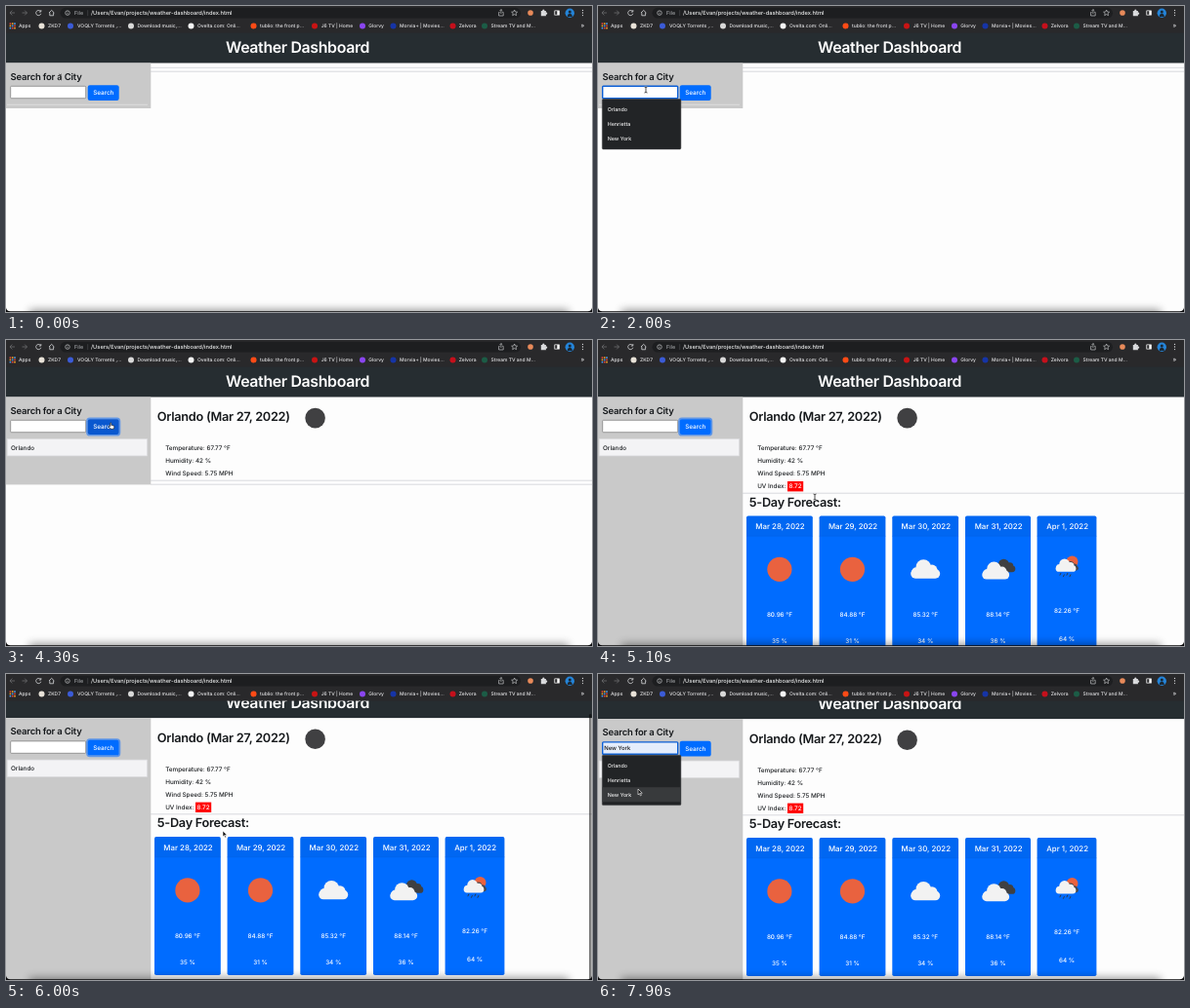
These frames come from a looping animation (600 px wide and 314 px high, 8000 ms). An HTML page:

```html
<!DOCTYPE html>
<html lang="en">
<head>
<meta charset="utf-8">
<title>Weather Dashboard</title>
<style>
  html, body { margin: 0; width: 100%; height: 100%; overflow: hidden; background: #fdfdfd; }
  svg { display: block; width: 100vw; height: 100vh; }
  text { font-family: Inter, "Open Sans", sans-serif; font-weight: 500; white-space: pre; text-rendering: geometricPrecision; }
  .heading { font-weight: 600; letter-spacing: -.022em; }
  .mid { text-anchor: middle; }
</style>
</head>
<body>
<svg id="stage" viewBox="0 0 600 314"></svg>
<script>
const LOOP = 8000;
const CITIES = ['Orlando', 'Henrietta', 'New York'];
const BODY = 6.34;

const text = (x, y, size, str, fill = '#1b1e21', attrs = '') =>
  `<text x="${x}" y="${y}" font-size="${size}" fill="${fill}" ${attrs}>${str}</text>`;
const rect = (x, y, w, h, fill, attrs = '') =>
  `<rect x="${x}" y="${y}" width="${w}" height="${h}" fill="${fill}" ${attrs}/>`;
const circle = (x, y, r, fill, attrs = '') =>
  `<circle cx="${x}" cy="${y}" r="${r}" fill="${fill}" ${attrs}/>`;
const line = (d, color, width = .8, attrs = '') =>
  `<path d="${d}" fill="none" stroke="${color}" stroke-width="${width}" ${attrs}/>`;
const group = (id, body, attrs = '') => `<g id="${id}" ${attrs}>${body}</g>`;

// Weather icons
const cloud = (x, y, scale, fill) =>
  `<g transform="translate(${x} ${y}) scale(${scale})">` +
  rect(-15.5, -.5, 31, 10, fill, 'rx="5"') + circle(-2, -2.5, 8, fill) +
  circle(7, .5, 5.6, fill) + circle(-9.5, 3, 5.2, fill) + '</g>';
const icons = {
  sun: x => circle(x, 235.3, 12.6, '#e9623f'),
  cloud: x => cloud(x, 235.5, .97, '#f2f2f2'),
  broken: x => cloud(x + 7.3, 231.8, .68, '#3f4042') + cloud(x - 2.3, 237, .9, '#f2f2f2'),
  rain: x => circle(x + 5.5, 227.5, 6, '#e9623f') + cloud(x + 4.5, 232, .48, '#45474c') +
    cloud(x - 1, 231.5, .67, '#f2f2f2') +
    [-6, -2.5, 1, 4].map((dx, i) =>
      line(`M${x + dx} ${239 + i % 2 * 1.5}l-1.2 2.6`, '#33363c', .9)).join('')
};

function card([x, w, date, icon, temp, humidity, lift = 0]) {
  const c = x + w / 2;
  return rect(x, 180.5, w, 142, '#006cff', 'rx="1.8"') +
    rect(x, 180.5, w, 20.7, '#000', 'rx="1.8" opacity=".05"') +
    line(`M${x} 201.2h${w}`, '#005fe0', .5) +
    text(c + .6, 194, 7.85, date, '#fff', 'class="mid" font-weight="500"') +
    icons[icon](c) +
    text(c, 284.4 - lift * 1.8, BODY, temp + ' °F', '#fff', 'class="mid"') +
    text(c, 311.2 - lift, BODY, humidity + ' %', '#fff', 'class="mid"');
}

const forecast = [
  [152, 67.8, 'Mar 28, 2022', 'sun', '80.96', 35],
  [226.6, 67.8, 'Mar 29, 2022', 'sun', '84.88', 31],
  [301.3, 67.8, 'Mar 30, 2022', 'cloud', '85.32', 34],
  [376, 67, 'Mar 31, 2022', 'broken', '88.14', 36],
  [449.6, 60.8, 'Apr 1, 2022', 'rain', '82.26', 64, 2.6]
];

const EDGE = '#cfd0d6';
const page =
  rect(0, 27, 600, 31.5, '#262d31') +
  text(298.6, 48.2, 15.9, 'Weather Dashboard', '#fff', 'class="heading mid"') +
  `<rect id="panel" y="58.5" width="148.3" fill="#c9c9c9"/>` +
  group('blank', line('M148 63.3H600M148 67.2H600', EDGE) + line('M1 101.3H145', '#dedede', 1)) +
  text(4.6, 75.6, 9.5, 'Search for a City', '#16191c', 'class="heading"') +
  `<rect id="input" x="4.7" y="82.3" width="77" height="12.4" rx=".8"/>` +
  `<text id="value" x="6.2" y="90.8" font-size="5.9" fill="#111"></text>` +
  group('caret', line('M7.2 84.6v8', '#111', .6)) +
  `<rect id="ring" x="83" y="80.5" width="33.4" height="17.2" rx="3" fill="none" stroke="#0d6efd" stroke-opacity=".55" stroke-width="1.8"/>` +
  `<rect id="button" x="83.7" y="81.2" width="32" height="15.8" rx="2.2"/>` +
  text(99.8, 91.4, BODY, 'Search', '#fff', 'class="mid"') +
  group('history', rect(1.2, 101.5, 143.3, 17.4, '#f3f3f5', 'stroke="#dcdcdf" stroke-width=".7"') +
    text(5, 112.6, BODY, 'Orlando')) +
  group('current',
    text(154.8, 83.4, 12.73, 'Orlando (Mar 27, 2022)', '#16191c', 'class="heading"') +
    circle(316.6, 80.1, 10.3, '#404042') +
    ['Temperature: 67.77 °F', 'Humidity: 42 %', 'Wind Speed: 5.75 MPH']
      .map((s, i) => text(163.2, 113.4 + 13 * i, BODY, s)).join('')) +
  group('partial', line('M148 144.2H600M148 148.2H600', EDGE)) +
  group('forecast',
    text(163.2, 152.4, BODY, 'UV Index:') + rect(194, 145, 16.2, 10.4, '#f00') +
    text(195.4, 152.4, BODY, '8.72', '#fff') +
    line('M148 157.2H600', EDGE) +
    text(154.8, 170.8, 12.73, '5-Day Forecast:', '#16191c', 'class="heading"') +
    forecast.map(card).join('')) +
  group('menu',
    rect(4.3, 95.6, 80.6, 51.4, '#222426', 'rx="1.2" stroke="#3a3b3d" stroke-width=".5"') +
    `<rect id="hover" x="4.6" width="80" height="15" fill="#383a3c"/>` +
    CITIES.map((s, i) => text(9.7, 108 + 15.1 * i, 5.35, s, '#f1f1f1')).join(''));

// Browser toolbar: icon x, icon colour, label x, label
const bookmarks = [
  [36.5, '#e8e2d8', 43, 'ZKD7'],
  [66, '#3b5bd6', 73, 'VOQLY Torrents ,...'],
  [128, '#d8d8d8', 134.5, 'Download music,...'],
  [189.5, '#f4f4f4', 196, 'Ovelta.com: Onli...'],
  [253.5, '#ff4b16', 260, 'tublio: the front p...'],
  [316, '#c81414', 322.7, 'J6 TV | Home'],
  [365, '#8a45f0', 371.3, 'Glorvy'],
  [396.5, '#1634a6', 403, 'Morvia+ | Movies...'],
  [457.5, '#c5101c', 463.7, 'Zelvora'],
  [490, '#1c5c46', 496.5, 'Stream TV and M...']
];
const GREY = '#d9dadc';
const appDots = [...Array(9).keys()].map(i =>
  rect(3.6 + i % 3 * 2.3, 17.3 + Math.floor(i / 3) * 2.3, 1.6, 1.6,
    ['#e8453c', '#f5a623', '#4a9df0'][(i + Math.floor(i / 3)) % 3])).join('');

const toolbar =
  rect(0, 0, 600, 27.6, '#29292b') +
  rect(55.5, 1.8, 471.5, 10.8, '#1d1e20', 'rx="5.4"') +
  line('M9 7H4M6.3 4.6L4 7l2.3 2.4M16.5 7h5M19.2 4.6L21.5 7l-2.3 2.4', '#6d6e70') +
  line('M35.3 5.4A2.6 2.6 0 1 0 35.8 7.8M35.8 4v2h-2', GREY) +
  line('M44 7l2.7-2.6L49.4 7M44.8 6.6v3.2h3.8V6.6', GREY) +
  circle(63, 7.1, 2.3, 'none', `stroke="${GREY}" stroke-width=".6"`) +
  line('M63 6.8v1.6M63 5.5v.6', GREY, .6) +
  text(70, 9.1, 5.4, 'File', '#a5a7aa') + line('M83.7 4.2v6', '#595a5c', .5) +
  text(87, 9.1, 5.72, '/Users/Evan/projects/weather-dashboard/index.html', '#eceded') +
  line('M505.6 6.4h-1v3.6h4.6V6.4h-1M506.9 8V3.6M505.5 4.9l1.4-1.4 1.4 1.4', GREY, .6) +
  line('M520.6 4l.9 2 2.1.2-1.6 1.4.5 2.1-1.9-1.1-1.9 1.1.5-2.1-1.6-1.4 2.1-.2z', GREY, .6) +
  circle(537, 7, 2.8, '#e88a5a') +
  `<path d="M547.8 5h1.5a1.1 1.1 0 1 1 2 0h1.6v1.7a1 1 0 1 1 0 1.9v1.7h-5.1z" fill="${GREY}"/>` +
  rect(561.4, 4.4, 5.4, 5.2, '#fff', 'rx=".5"') + rect(562.2, 5.2, 2.1, 3.6, '#29292b') +
  circle(577.3, 7.2, 4.7, '#2484d8') + circle(577.3, 6, 1.5, '#1a2733') +
  '<path d="M574.8 11c0-4.4 5-4.4 5 0z" fill="#1a2733"/>' +
  [4.4, 7, 9.6].map(y => circle(590.5, y, .65, GREY)).join('') +
  appDots + text(13, 22.3, 4.97, 'Apps', '#e6e6e8') +
  bookmarks.map(([ix, color, x, label]) =>
    circle(ix, 20.4, 3, color) + text(x, 22.3, 4.97, label, '#e6e6e8')).join('') +
  text(588.5, 22.3, 6, '»', '#e6e6e8');

const frameEdge =
  rect(24, 311.5, 552, 10, '#000', 'opacity=".4" filter="url(#soft)"') +
  '<path d="M0 309.5Q.4 313 4.5 313.2H595.5Q599.6 313 600 309.5V314H0z" fill="#08080a"/>';

const pointer =
  group('beam',
    line('M-1.5-3Q0-3 0-2V2Q0 3-1.5 3M1.5-3Q0-3 0-2M1.5 3Q0 3 0 2', '#fff', 1.5, 'opacity=".7"') +
    line('M-1.5-3Q0-3 0-2V2Q0 3-1.5 3M1.5-3Q0-3 0-2M1.5 3Q0 3 0 2', '#111', .75)) +
  group('arrow', '<path d="M0 0V5.9L1.4 4.6 2.4 6.9 3.4 6.4 2.4 4.2H4.3z" fill="#111" stroke="#fff" stroke-width=".6"/>') +
  group('hand', '<path d="M-1.3-2.8q.6-.7 1.1 0V-.6l2.3.5q.9.2.8 1.1L2.4 3.2H-1L-2.9.7q0-.9.9-.5l.7.6z" fill="#fff" stroke="#111" stroke-width=".6"/>');

document.getElementById('stage').innerHTML =
  '<defs><filter id="soft" x="-10%" y="-200%" width="120%" height="500%"><feGaussianBlur stdDeviation="4"/></filter></defs>' +
  rect(0, 0, 600, 314, '#fdfdfd') + group('page', page) +
  '<rect id="scrollbar" x="597" width="2.6" height="273" rx="1.3" fill="#000"/>' +
  frameEdge + toolbar + group('pointer', pointer);

const el = id => document.getElementById(id);
const set = (id, attrs) => Object.entries(attrs).forEach(([k, v]) => el(id).setAttribute(k, v));
const show = (id, on) => set(id, { visibility: on ? 'visible' : 'hidden' });
const clamp = v => Math.min(1, Math.max(0, v));
const ease = v => v * v * (3 - 2 * v);
const ramp = (t, from, to) => clamp((t - from) / (to - from));

// Time, x, y
const pointerPath = [
  [0, 55.5, 73], [50, 55.5, 73], [450, 49, 86], [2750, 49, 86], [3150, 38, 104],
  [3400, 38, 104], [4050, 108, 88], [4650, 108, 88], [5050, 222, 161],
  [6250, 222, 161], [6900, 70, 75.5], [7450, 70, 75.5], [7800, 41, 118], [LOOP, 41, 118]
];
function pointerAt(t) {
  const i = pointerPath.findIndex(k => k[0] > t);
  const [t0, x0, y0] = pointerPath[i - 1], [t1, x1, y1] = pointerPath[i];
  const k = ease(ramp(t, t0, t1));
  return [x0 + (x1 - x0) * k, y0 + (y1 - y0) * k];
}

function draw(t) {
  const scroll = 13.4 * (1 - (1 - ramp(t, 5250, 5900)) ** 3) - ease(ramp(t, 6050, 6350));
  const [x, y] = pointerAt(t);
  const pageY = y + scroll;

  const menuOpacity = t < 3400 ? ramp(t, 1300, 1450) : ramp(t, 7000, 7150);
  const row = menuOpacity && x < 85 ? Math.floor((pageY - 98.4) / 15.1) : -1;
  const focusStart = t < 4150 ? 450 : 6950;
  const focused = t >= focusStart;
  const value = CITIES[row] || (t >= 3400 && t < 4250 ? CITIES[0] : '');
  const overButton = x > 84 && x < 116 && pageY > 81 && pageY < 97;
  const overInput = x > 4 && x < 82 && pageY > 82 && pageY < 95.5;
  const loaded = t >= 4250, complete = t >= 4350;

  set('page', { transform: `translate(0 ${-scroll})` });
  set('scrollbar', { y: 27.6 + scroll, opacity: .5 * ramp(t, 5250, 5350) * (1 - ramp(t, 6350, 6650)) });
  set('panel', { height: complete ? 290 : loaded ? 89.9 : 46.5 });
  show('blank', !loaded);
  show('history', loaded);
  show('current', loaded);
  show('partial', loaded && !complete);
  show('forecast', complete);

  set('input', {
    fill: value ? '#e4edfc' : '#fff',
    stroke: focused ? '#0b5fd6' : '#777',
    'stroke-width': focused ? 1.4 : .7
  });
  el('value').textContent = value;
  show('caret', focused && !value && (t - focusStart) % 1000 < 500);
  set('button', { fill: overButton ? '#0a58cf' : '#006cff' });
  set('ring', { opacity: t < 4150 ? 0 : 1 - ramp(t, 7000, 7200) });
  set('menu', { opacity: menuOpacity });
  set('hover', { y: 98.4 + 15.1 * row, opacity: row >= 0 && row < 3 ? 1 : 0 });

  const overText = t < 500 || (t > 4980 && t < 5400);
  const kind = overButton ? 'hand' : row < 0 && (overInput || overText) ? 'beam' : 'arrow';
  ['beam', 'arrow', 'hand'].forEach(id => show(id, id === kind));
  set('pointer', { transform: `translate(${x} ${y})` });
}

const start = performance.now();
function tick() {
  draw((performance.now() - start) % LOOP);
  requestAnimationFrame(tick);
}
tick();
</script>
</body>
</html>
```
